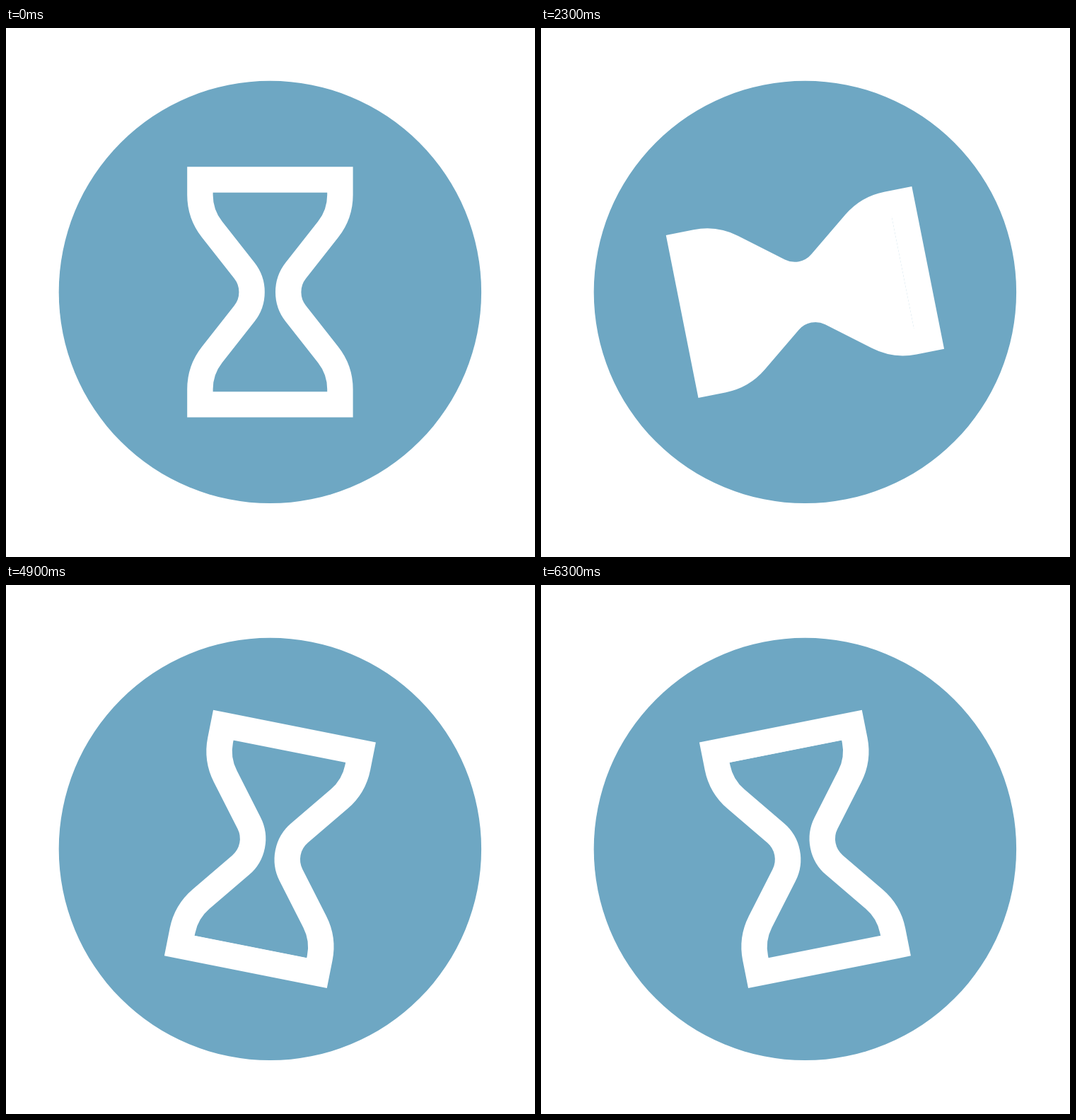
Animation, 748 px wide and 748 px high, one loop 6.4 s. Source, as an HTML page with a canvas:

```html
<!DOCTYPE html>
<html lang="en">
<head>
<meta charset="utf-8">
<title>Hourglass</title>
<style>
  html, body { margin: 0; width: 100%; height: 100%; overflow: hidden; background: #fff; }
  canvas { display: block; width: 748px; height: 748px; }
</style>
</head>
<body>
<canvas id="stage" width="748" height="748"></canvas>
<script>
const ctx = document.getElementById('stage').getContext('2d');
const CENTER = 373.4, DISC = 298.7, BLUE = '#6ea7c3';
const STEP_MS = 100, PHASE = 16;

// Centre line of the glass wall, relative to the middle of the disc.
const WALL = 36.4;
const HALF_W = 99, HALF_H = 159;
const SHOULDER_R = 79, NECK_R = 49;
const SHOULDER_Y = 137.4, NECK_X = 25.8;

// The sand is a block that travels through the glass at constant speed.
const SAND_START = -141, SAND_SPEED = 18.13;
const SAND_H = SAND_SPEED * PHASE;

function glassPath() {
  const shoulderX = HALF_W - SHOULDER_R;
  const neckX = NECK_X + NECK_R;
  const dx = neckX - shoulderX;
  const slope = Math.asin((SHOULDER_R + NECK_R) / Math.hypot(dx, SHOULDER_Y))
              - Math.atan2(dx, SHOULDER_Y);
  const path = new Path2D();
  path.moveTo(-HALF_W, -HALF_H);
  path.lineTo(HALF_W, -HALF_H);
  path.arc(shoulderX, -SHOULDER_Y, SHOULDER_R, 0, slope);
  path.arc(neckX, 0, NECK_R, Math.PI + slope, Math.PI - slope, true);
  path.arc(shoulderX, SHOULDER_Y, SHOULDER_R, -slope, 0);
  path.lineTo(HALF_W, HALF_H);
  path.lineTo(-HALF_W, HALF_H);
  path.arc(-shoulderX, SHOULDER_Y, SHOULDER_R, Math.PI, Math.PI + slope);
  path.arc(-neckX, 0, NECK_R, slope, -slope, true);
  path.arc(-shoulderX, -SHOULDER_Y, SHOULDER_R, Math.PI - slope, Math.PI);
  path.closePath();
  return path;
}

const glass = glassPath();

function draw(step) {
  const phase = Math.floor(step / PHASE);
  const k = step % PHASE;
  const turning = phase % 2 === 1;
  const filling = phase < 2;
  const moved = turning ? PHASE : k;
  const sandTop = filling
    ? SAND_START + SAND_SPEED * moved - SAND_H
    : -SAND_START - SAND_H + SAND_SPEED * moved;

  ctx.setTransform(1, 0, 0, 1, 0, 0);
  ctx.fillStyle = '#fff';
  ctx.fillRect(0, 0, 748, 748);

  ctx.translate(CENTER, CENTER);
  if (turning) ctx.rotate(Math.PI * k / PHASE);

  ctx.fillStyle = BLUE;
  ctx.beginPath();
  ctx.arc(0, 0, DISC, 0, Math.PI * 2);
  ctx.fill();

  ctx.save();
  ctx.clip(glass);
  ctx.fillStyle = '#fff';
  ctx.fillRect(-HALF_W, sandTop, HALF_W * 2, SAND_H);
  ctx.restore();

  ctx.strokeStyle = '#fff';
  ctx.lineWidth = WALL;
  ctx.lineJoin = 'miter';
  ctx.stroke(glass);
}

const start = performance.now();
function tick() {
  const elapsed = performance.now() - start;
  draw(Math.floor(elapsed / STEP_MS) % (PHASE * 4));
  requestAnimationFrame(tick);
}
tick();
</script>
</body>
</html>
```
